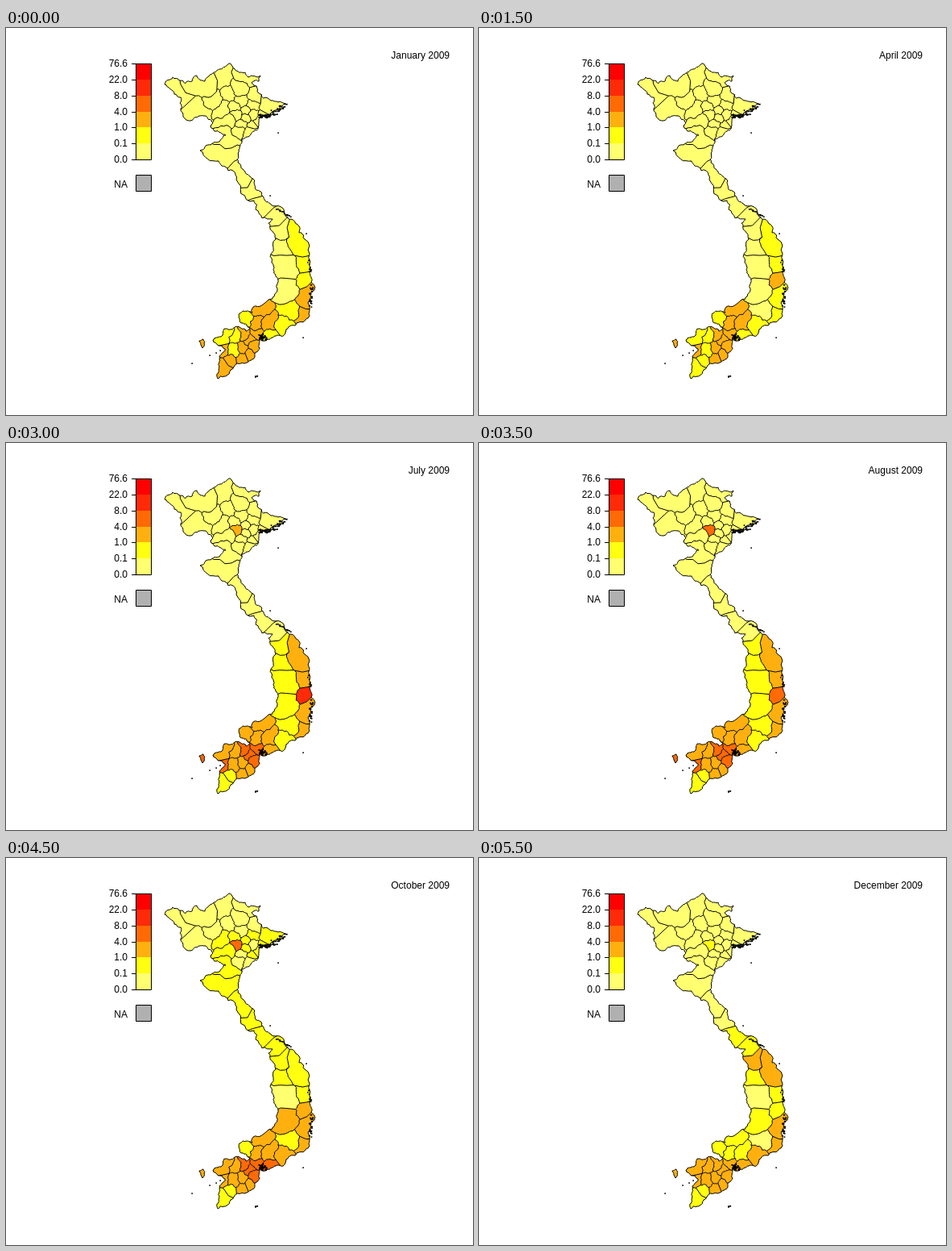
An HTML page with a canvas that plays this animation: 580x480 px, repeating every 6000 ms.

```html
<!DOCTYPE html>
<html lang="en">
<head>
<meta charset="utf-8">
<title>Monthly map</title>
<style>
html, body { margin: 0; width: 100%; height: 100%; overflow: hidden; background: #fff; }
canvas { display: block; width: 580px; height: 480px; }
</style>
</head>
<body>
<canvas id="stage" width="580" height="480"></canvas>
<script>
const ctx = document.getElementById('stage').getContext('2d');
const MONTHS = ['January', 'February', 'March', 'April', 'May', 'June', 'July',
  'August', 'September', 'October', 'November', 'December'];
const COLORS = ['#ffff70', '#ffff10', '#ffb00f', '#ff6a05', '#ff2a08', '#ff0000'];
const LIMITS = ['0.0', '0.1', '1.0', '4.0', '8.0', '22.0', '76.6'];
const STEP = 500;

// Key points of the country's border, clockwise.
const BORDER = '197,70 207,61 215,65 231,66 237,59 247,66 257,56 266,51 277,44 284,51 297,55 301,61 316,59 314,66 305,68 313,80 329,90';
const COAST = '347,94 334,102 319,109 314,117 308,128 299,135 293,138 289,151 288,167 297,178 307,187 310,200 320,210 329,219 348,234 354,237 364,254 371,262 378,299 379,310 383,320 378,331 377,349 372,362 359,369 347,378 335,382 322,388 314,387 315,397 309,408 299,415 279,424 271,432 263,435';
const WEST = '264,424 265,411 272,398 257,387 267,383 271,373 284,371 298,376 303,372 293,366 290,354 295,351 306,353 307,346 326,337 333,333 335,308 330,291 335,262 326,242 331,237 310,225 308,214 286,188 272,172 264,165 241,152 254,145 265,141 273,133 259,128 254,122 257,118 246,109 229,115 217,100 217,86 209,82';
const ISLE = '240,388 245,386 246,391 244,397 242,393';

// Provinces that share a course: month:level keys held until the next, then centres.
const REGIONS = {
  mountains: ['0:0', '217,80 250,72 242,102 259,88 268,65 298,62 277,83 290,76 310,84 292,91'],
  lowland: ['0:0', '306,108 293,120 301,129 291,126'],
  capital: ['0:0 6:2 7:3 11:1', '286,108'],
  northCoast: ['0:0 8:1 11:0', '271,99 284,99 278,114 306,97 298,104 326,98 313,112 298,111 306,122 279,136 278,158 290,178 303,200'],
  narrows: ['0:0 8:1', '316,221 335,230'],
  upperCoast: ['0:0 6:1 10:2', '344,247'],
  midCoast: ['0:1 6:2 8:1 10:2', '364,267'],
  lowerCoast: ['0:1 6:2 8:1', '372,291'],
  northHills: ['0:0 6:1 10:2 11:1', '344,272'],
  plateau: ['0:0 4:1 8:0 10:1 11:0', '352,297'],
  southHills: ['0:0 4:1 8:2 10:1', '350,325'],
  highlands: ['0:1 3:0 4:1 11:0', '354,350'],
  peak: ['0:1 3:2 6:4 7:3 8:2 10:1', '376,314'],
  cape: ['0:2 3:1 4:2', '373,337 369,356'],
  dryCoast: ['0:1 8:2', '346,371'],
  southEast: ['0:2 11:1', '313,350 312,366 326,368'],
  frontier: ['0:1 6:2 8:1', '299,361'],
  harbour: ['0:1 6:2 8:3 11:2', '328,383'],
  city: ['0:2 6:3 10:2', '311,378 296,380 303,387 308,395'],
  upperDelta: ['0:1 4:2', '283,382 273,381'],
  midDelta: ['0:1 6:2 10:1 11:2', '284,400'],
  lowerDelta: ['0:2', '294,397 304,404'],
  deltaCoast: ['0:2 4:3 5:2', '294,410'],
  gulf: ['0:2 4:3 8:2', '268,398'],
  tip: ['0:2 1:1', '280,415 269,421']
};

function points(text) {
  return text.split(' ').map(p => p.split(',').map(Number));
}

function hash(x, y) {
  const v = Math.sin(x * 12.9898 + y * 78.233) * 43758.5453;
  return v - Math.floor(v);
}

// Midpoint displacement; leaves out the last point.
function roughen(a, b, depth) {
  const dx = b[0] - a[0], dy = b[1] - a[1];
  if (!depth || Math.hypot(dx, dy) < 2.5) return [a];
  const k = (hash(a[0] + b[0], a[1] + b[1]) - 0.5) * 0.45;
  const m = [(a[0] + b[0]) / 2 - dy * k, (a[1] + b[1]) / 2 + dx * k];
  return [...roughen(a, m, depth - 1), ...roughen(m, b, depth - 1)];
}

// The same rough line from both sides of a shared edge.
function edge(a, b) {
  const ordered = a[0] < b[0] || (a[0] === b[0] && a[1] < b[1]);
  return ordered ? [...roughen(a, b, 3), b] : [...roughen(b, a, 3), a].reverse();
}

function edges(corners) {
  return corners.map((a, i) => edge(a, corners[(i + 1) % corners.length]));
}

function closedPath(corners) {
  const path = new Path2D();
  edges(corners).flat().forEach((p, i) => i ? path.lineTo(...p) : path.moveTo(...p));
  path.closePath();
  return path;
}

// Part of a polygon that lies closer to s than to o.
function cut(polygon, s, o) {
  const side = p => (p[0] - (s[0] + o[0]) / 2) * (o[0] - s[0]) +
    (p[1] - (s[1] + o[1]) / 2) * (o[1] - s[1]);
  const kept = [];
  polygon.forEach((a, i) => {
    const b = polygon[(i + 1) % polygon.length];
    const u = side(a), v = side(b);
    if (u <= 0) kept.push(a);
    if (u * v < 0) {
      const t = u / (u - v);
      kept.push([a[0] + (b[0] - a[0]) * t, a[1] + (b[1] - a[1]) * t]);
    }
  });
  return kept;
}

function levelAt(course, month) {
  const keys = course.split(' ').map(k => k.split(':').map(Number));
  return keys.filter(k => k[0] <= month).pop()[1];
}

const country = closedPath(points([BORDER, COAST, WEST].join(' ')));
const isle = closedPath(points(ISLE));
const seeds = Object.values(REGIONS).flatMap(([course, centres]) =>
  points(centres).map(at => ({ course, at })));
const borders = new Path2D();
const seen = new Set();

const provinces = seeds.map(seed => {
  let cell = points('150,0 430,0 430,480 150,480');
  for (const other of seeds) {
    if (other !== seed) cell = cut(cell, seed.at, other.at);
  }
  cell = cell.map(p => p.map(v => Math.round(v * 10) / 10));
  for (const line of edges(cell)) {
    const key = [line[0], line[line.length - 1]].map(String).sort().join(' ');
    if (seen.has(key)) continue;
    seen.add(key);
    line.forEach((p, i) => i ? borders.lineTo(...p) : borders.moveTo(...p));
  }
  return { course: seed.course, path: closedPath(cell) };
});

// Islets scattered along a line: x1, y1, x2, y2, count, spread.
const CHAINS = [
  [313, 109, 328, 109, 32, 5], [327, 109, 346, 95, 30, 6],
  [336, 224, 354, 235, 12, 2], [375, 288, 379, 304, 7, 2],
  [379, 320, 378, 346, 22, 4], [315, 381, 322, 387, 34, 6],
  [309, 432, 312, 432, 3, 2]
];
const DOTS = points('231,416 253,406 261,403 266,400 338,130 328,208 373,255 369,384');

function islets() {
  ctx.fillStyle = '#000';
  for (const [x1, y1, x2, y2, n, spread] of CHAINS) {
    for (let i = 0; i < n; i++) {
      const t = (i + 0.5) / n;
      const x = x1 + (x2 - x1) * t + (hash(x1 + i, y1) - 0.5) * spread;
      const y = y1 + (y2 - y1) * t + (hash(x2, y2 + i) - 0.5) * spread;
      ctx.fillRect(x - 0.9, y - 0.8, 1.4 + hash(i, x1) * 1.2, 1.7);
    }
  }
  for (const [x, y] of DOTS) ctx.fillRect(x - 0.7, y - 0.7, 1.6, 1.6);
}

function label(text, x, y) {
  ctx.fillStyle = '#000';
  ctx.fillText(text, x, y);
}

function box(color, y, height) {
  ctx.fillStyle = color;
  ctx.fillRect(162, y, 19, height);
}

function legend() {
  const yAt = i => Math.round(163 - i * 119 / 6);
  COLORS.forEach((color, i) => box(color, yAt(i + 1), yAt(i) - yAt(i + 1)));
  box('#b0b0b0', 183, 20);
  ctx.strokeRect(161.5, 44.5, 19, 119);
  ctx.strokeRect(161.5, 182.5, 19, 20);
  LIMITS.forEach((text, i) => {
    ctx.fillStyle = '#000';
    ctx.fillRect(156, yAt(i), 6, 1);
    label(text, 151, yAt(i) + 4);
  });
  label('NA', 151, 198);
}

function draw(month) {
  ctx.fillStyle = '#fff';
  ctx.fillRect(0, 0, 580, 480);
  ctx.strokeStyle = '#000';
  ctx.lineWidth = 1;
  ctx.lineJoin = 'round';
  ctx.font = '12px "Liberation Sans", Arial, sans-serif';
  ctx.textAlign = 'right';

  ctx.save();
  ctx.clip(country);
  for (const p of provinces) {
    ctx.fillStyle = COLORS[levelAt(p.course, month)];
    ctx.fill(p.path);
  }
  ctx.stroke(borders);
  ctx.restore();
  ctx.stroke(country);

  ctx.fillStyle = COLORS[levelAt(REGIONS.gulf[0], month)];
  ctx.fill(isle);
  ctx.stroke(isle);
  islets();
  legend();
  label(MONTHS[month] + ' 2009', 551, 38);
}

let shown = -1;
const start = performance.now();
function tick() {
  const month = Math.floor((performance.now() - start) / STEP) % MONTHS.length;
  if (month !== shown) draw(shown = month);
  requestAnimationFrame(tick);
}
tick();
</script>
</body>
</html>
```
